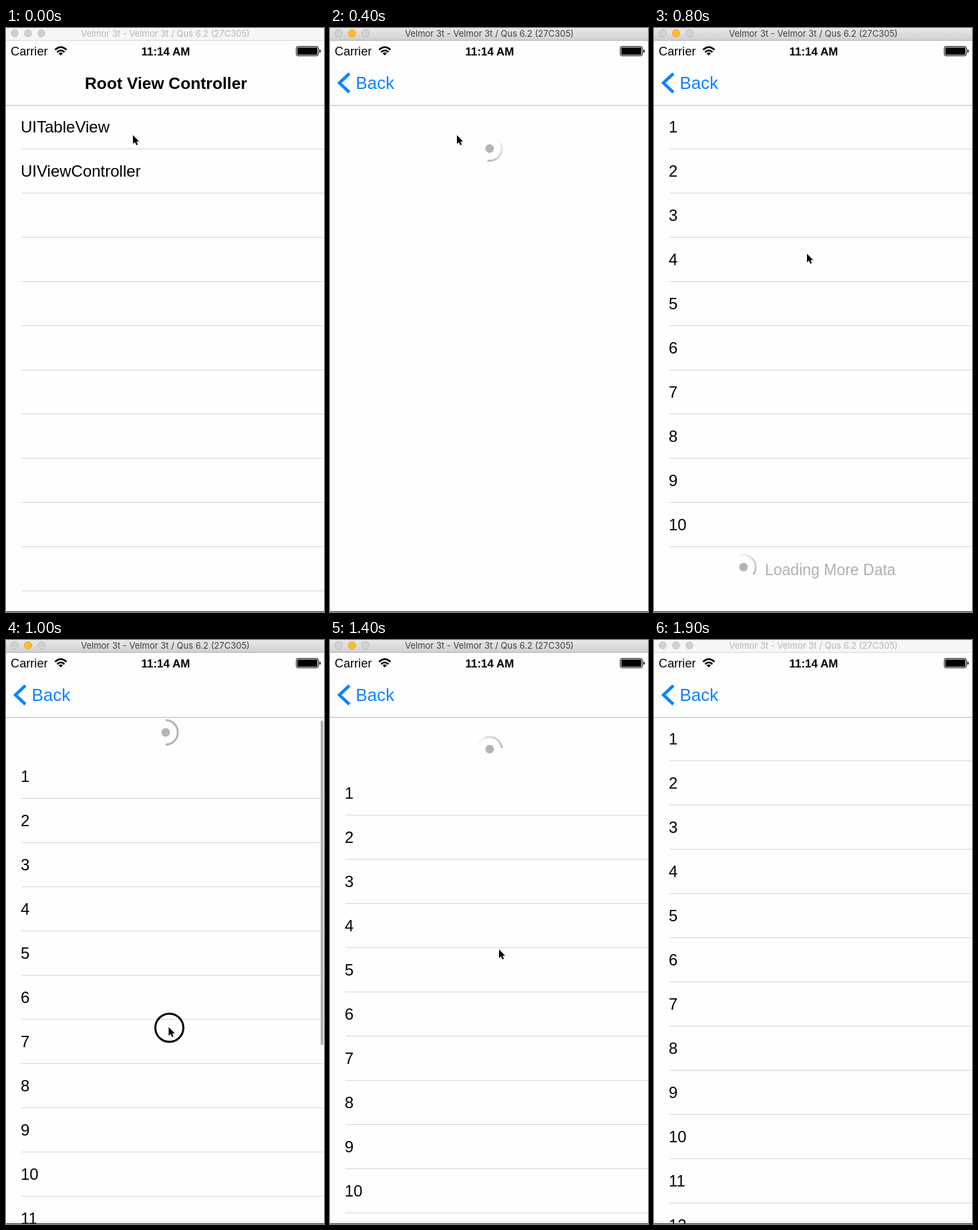
Write an HTML page that moves like this. It is 476 by 872 pixels and loops after 2 s.

```html
<!DOCTYPE html>
<html lang="en">
<head>
<meta charset="utf-8">
<title>Pull to refresh</title>
<style>
  html, body { margin: 0; width: 100%; height: 100%; overflow: hidden; background: #fefefe; }
  svg { display: block; width: 476px; height: 872px; font-family: "Liberation Sans", Arial, sans-serif; }
  .row { font-size: 24px; }
  .window-title { font: 13px Inter, sans-serif; text-anchor: middle; }
  .nav-title { font-size: 24.6px; font-weight: bold; text-anchor: middle; }
  .clock { font-size: 17px; font-weight: bold; text-anchor: middle; }
  .loader { fill: none; stroke: #b4b4b4; stroke-width: 3; }
</style>
</head>
<body>
<svg viewBox="0 0 476 872">
  <defs>
    <linearGradient id="chrome" x2="0" y2="1">
      <stop stop-color="#e8e8e8"/><stop offset="1" stop-color="#d1d1d1"/>
    </linearGradient>
  </defs>
  <g id="content"></g>

  <rect width="476" height="115" fill="#fefefe"/>
  <path d="M0 115.5H476" stroke="#b8b8b8"/>
  <g id="windowBar"></g>

  <text x="7" y="41" font-size="18.2">Carrier</text>
  <g fill="none" stroke="#000" stroke-width="2.6">
    <path d="M73.5 32.5Q82 24.5 90.500 32.500M76.500 36Q82 31 87.500 36"/>
    <path d="M82 41L78.800 37.800Q82 35.400 85.200 37.800Z" fill="#000" stroke="none"/>
  </g>
  <text class="clock" x="239" y="41">11:14 AM</text>
  <rect x="434.500" y="27.500" width="33" height="14" rx="2.500" fill="none" stroke="#000"/>
  <rect x="436" y="29" width="30" height="11" rx="1" />
  <path d="M469 32Q471 32 471 34.500Q471 37 469 37Z"/>

  <text id="navTitle" class="nav-title" x="239.500" y="91">Root View Controller</text>
  <g id="back" fill="#0b84ff">
    <path d="M29 68L14 82L29 96" fill="none" stroke="#0b84ff" stroke-width="4.500"/>
    <text x="38.500" y="91" font-size="26">Back</text>
  </g>
  <g id="pointer"></g>
  <path d="M0 871.500H476" stroke="#333"/>
</svg>

<script>
const LOOP = 2000, STEP = 100, ROW = 66, REST = 79;
const byId = id => document.getElementById(id);
const cursorPath = [
  [0, 190, 160], [600, 190, 160], [800, 229, 337], [900, 238, 450],
  [1100, 249, 706], [1200, 250, 700], [1400, 253, 462], [1500, 253, 455]
];

function cursorAt(t) {
  const next = cursorPath.findIndex(p => p[0] > t);
  if (next < 0) return cursorPath.at(-1).slice(1);
  const [t0, x0, y0] = cursorPath[next - 1], [t1, x1, y1] = cursorPath[next];
  const k = (t - t0) / (t1 - t0);
  return [x0 + (x1 - x0) * k, y0 + (y1 - y0) * k];
}

// How far the list hangs below the navigation bar.
function pullAt(t) {
  const settle = (extra, start) => REST + extra * Math.exp(-(t - start) * 0.0093);
  if (t < 700) return settle(19, Math.min(t, 400));
  if (t < 1000 || t >= 1900) return 0;
  if (t < 1100) return 56;
  return Math.round(settle(33, 1100));
}

function separators(offset, count) {
  let d = "";
  for (let i = 1; i <= count; i++) d += `M23 ${114.5 + offset + i * ROW}H476`;
  return `<path d="${d}" stroke="#d6d6d8"/>`;
}

function rows(labels, offset) {
  return labels.map((label, i) =>
    `<text class="row" x="22" y="${156 + offset + i * ROW}">${label}</text>`).join("");
}

const badge = (x, y) => `<circle cx="${x}" cy="${y}" r="6.5" fill="#b4b4b4"/>`;

// An arc that fades from its tail to its leading end.
function spinner(x, y, head) {
  const sweep = 152, parts = 19, size = sweep / parts;
  let arcs = "";
  const point = deg => {
    const a = deg * Math.PI / 180;
    return `${(x + 18.2 * Math.cos(a)).toFixed(2)} ${(y + 18.2 * Math.sin(a)).toFixed(2)}`;
  };
  for (let i = 0; i < parts; i++) {
    const from = head - sweep + i * size;
    arcs += `<path d="M${point(from)}A18.2 18.2 0 0 1 ${point(from + size)}" stroke-opacity="${(i + 1) / parts}"/>`;
  }
  return `<g class="loader">${arcs}</g>${badge(x, y)}`;
}

function pullRing(x, y, progress) {
  return `<circle class="loader" cx="${x}" cy="${y}" r="18.2" pathLength="100"
    stroke-dasharray="${progress * 100} 100" transform="rotate(-90 ${x} ${y})"/>${badge(x, y)}`;
}

function content(t) {
  if (t < 200) {
    const pressed = t >= 100 ? '<rect y="116" width="476" height="65" fill="#d9d9d9"/>' : "";
    return pressed + separators(0, 11) + rows(["UITableView", "UIViewController"], 0);
  }
  const pull = pullAt(t);
  const head = t < 1200 ? 100 + 0.74 * (t - 400) : -5 + 0.75 * (t - 1400);
  if (t < 700) return spinner(239, 82 + pull, head);

  const loadingMore = t < 900;
  const count = loadingMore ? 10 : 12;
  let out = separators(pull, count) + rows(Array.from({ length: count }, (_, i) => i + 1), pull);
  if (loadingMore) {
    out += spinner(134, 805, head) +
      '<text x="166" y="817" font-size="23" fill="#b0b0b0">Loading More Data</text>';
  }
  if (pull) {
    out += t < 1200 ? pullRing(239, 82 + pull, Math.min(1, pull / 112)) : spinner(239, 82 + pull, head);
  }
  if (t >= 1000 && t < 1200) {
    out += '<rect x="471" y="120" width="4" height="485" rx="2" fill="#b3b3b3"/>';
  }
  return out;
}

function windowBar(active) {
  const lights = [13, 33, 53].map((x, i) => {
    const amber = active && i === 1;
    const fill = amber ? "#fdbc2e" : active ? "#d3d3d3" : "#d0d0d0";
    const edge = amber ? "#e5a52b" : active ? "#b9b9b9" : "#cbcbcb";
    return `<circle cx="${x}" cy="8" r="5.5" fill="${fill}" stroke="${edge}"/>`;
  }).join("");
  return `<rect width="476" height="18" fill="${active ? "url(#chrome)" : "#f6f6f6"}"/>
    <path d="M0 18.5H476" stroke="${active ? "#b1b1b1" : "#d6d6d6"}"/>${lights}
    <text class="window-title" x="238.5" y="13" fill="${active ? "#404040" : "#b4b4b4"}">Velmor 3t - Velmor 3t / Qus 6.2 (27C305)</text>`;
}

function pointer(t) {
  if (t >= 1600) return "";
  const [x, y] = cursorAt(t);
  const touching = t === 100 || t === 1000 || t === 1100;
  const ring = touching ? `<circle cx="${x + 1}" cy="${y + 1}" r="21" fill="none" stroke="#000" stroke-width="3"/>` : "";
  return `${ring}<path transform="translate(${x} ${y})" d="M0 0V13L3 10.300L5 15L7.300 14L5.300 9.500H9.300Z"
    stroke="#fff" stroke-width="1.500" paint-order="stroke"/>`;
}

function draw(t) {
  byId("content").innerHTML = content(t);
  byId("windowBar").innerHTML = windowBar(t > 0 && t < 1900);
  byId("pointer").innerHTML = pointer(t);
  byId("navTitle").style.display = t < 200 ? "" : "none";
  byId("back").style.display = t < 200 ? "none" : "";
}

const start = performance.now();
let shown = -1;
function tick() {
  const t = Math.floor((performance.now() - start) % LOOP / STEP) * STEP;
  if (t !== shown) draw(shown = t);
  requestAnimationFrame(tick);
}
tick();
</script>
</body>
</html>
```
